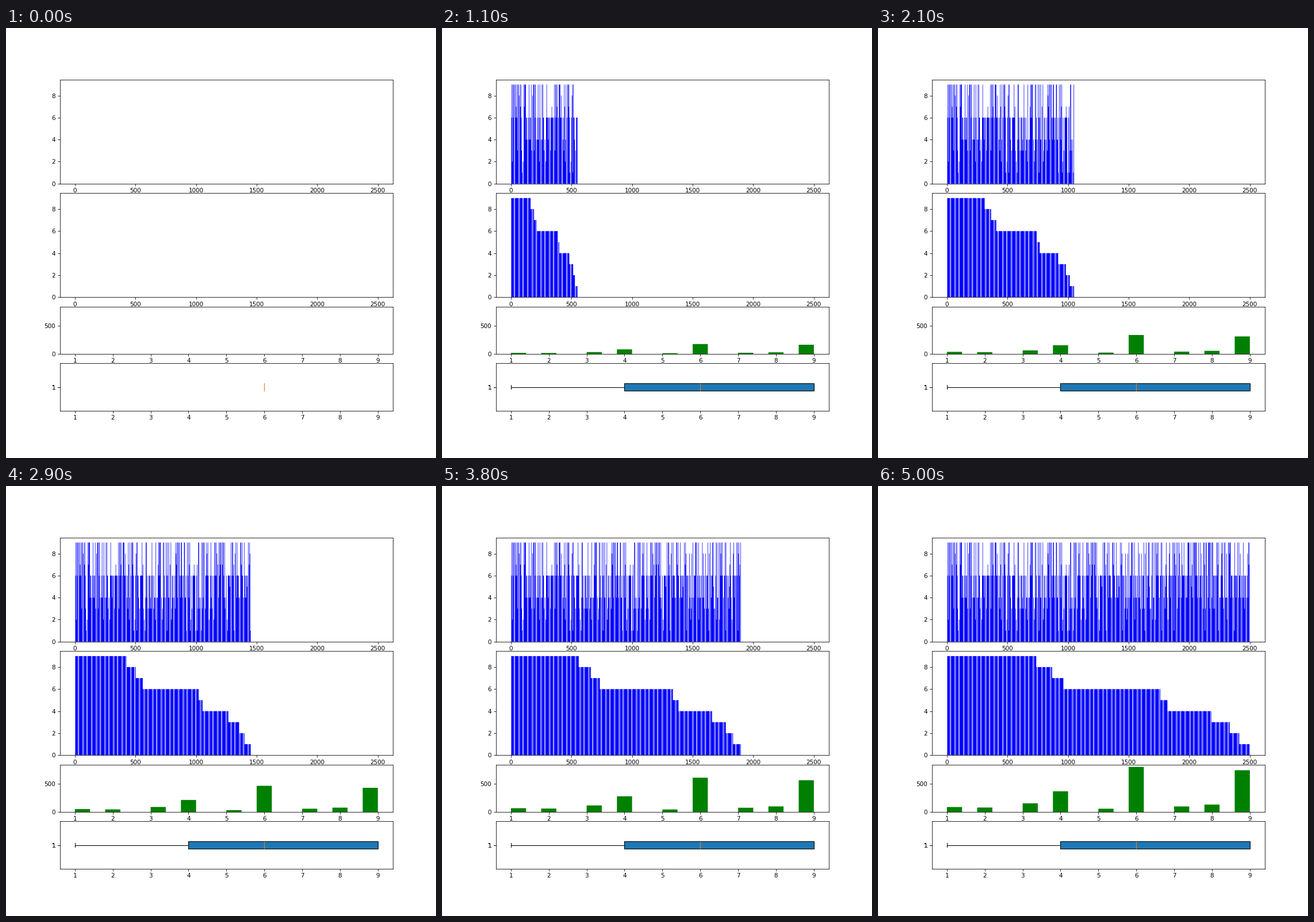
Write a matplotlib script that moves like this. It is 748x748 px and loops after 5.1 s.

```python
import numpy as np
import matplotlib.pyplot as plt
from matplotlib.animation import FuncAnimation

INCHES, DPI = 10, 74.8
FRAMES, STEP = 51, 50
# How often each value from 1 to 9 occurs.
COUNTS = [87, 78, 152, 365, 57, 797, 97, 130, 738]
TOTAL = sum(COUNTS)

BAR_HALF = 0.4
SPAN = (TOTAL - 1 + 2 * BAR_HALF) * 1.1
X_LEFT = (TOTAL - 1 - SPAN) / 2

# The bars are thinner than a screen column, so each column samples one bar or a gap.
COLUMNS = 775
col_edges = X_LEFT + np.arange(COLUMNS + 1) / COLUMNS * SPAN
col_mids = (col_edges[:-1] + col_edges[1:]) / 2
col_index = np.round(col_mids).astype(int)
on_bar = (np.abs(col_mids - col_index) < BAR_HALF) & (col_index >= 0)


def make_data():
    """Spread every value evenly with jitter, and begin with a six."""
    rng = np.random.default_rng(7)
    times = np.concatenate([(np.arange(c) + rng.random(c)) / c for c in COUNTS])
    data = np.repeat(np.arange(1, 10), COUNTS)[np.argsort(times)]
    return np.roll(data, -np.argmax(data == 6))


def sample(heights):
    """Height seen in each screen column."""
    seen = on_bar & (col_index < len(heights))
    return np.where(seen, heights[np.where(seen, col_index, 0)], 0)


def add_bars(ax):
    bars = ax.stairs(np.zeros(COLUMNS), col_edges, fill=True, color="b", snap=False)
    ax.set_xlim(X_LEFT, X_LEFT + SPAN)
    ax.set_ylim(0, 9.45)
    return bars


def add_box(ax, values):
    parts = ax.boxplot(values, vert=False, patch_artist=True, manage_ticks=False)
    return [artist for group in parts.values() for artist in group]


def show(artists, visible):
    for artist in artists:
        artist.set_visible(visible)


data = make_data()

fig = plt.figure(figsize=(INCHES, INCHES), dpi=DPI, facecolor="white")
grid = fig.add_gridspec(6, 1, left=0.125, right=0.9, bottom=0.11, top=0.88, hspace=0.2)
raw_ax = fig.add_subplot(grid[0:2])
sorted_ax = fig.add_subplot(grid[2:4])
hist_ax = fig.add_subplot(grid[4])
box_ax = fig.add_subplot(grid[5])

raw_bars = add_bars(raw_ax)
sorted_bars = add_bars(sorted_ax)

bins = np.linspace(1, 9, 21)
hist_bars = hist_ax.bar(bins[:-1], np.zeros(20), width=0.4, align="edge",
                        color="g", snap=False)
hist_ax.set_ylim(0, 1.05 * max(COUNTS))
hist_ax.set_yticks([0, 500])

first_box = add_box(box_ax, data[:1])
full_box = add_box(box_ax, data)
box_ax.set_ylim(0.5, 1.5)
# Stacked ticks give the heavy label.
box_ax.set_yticks([1] * FRAMES, ["1"] * FRAMES)

for ax in (hist_ax, box_ax):
    ax.set_xlim(0.6, 9.4)
    ax.set_xticks(range(1, 10))


def update(frame):
    part = data[:STEP * frame + 1]
    started = frame > 0
    raw_bars.set_data(values=sample(part))
    sorted_bars.set_data(values=sample(np.sort(part)[::-1]))
    show([raw_bars, sorted_bars, *hist_bars], started)
    for bar, count in zip(hist_bars, np.histogram(part, bins)[0]):
        bar.set_height(count)
    show(first_box, not started)
    show(full_box, started)
    return []


anim = FuncAnimation(fig, update, frames=FRAMES, interval=100,
                     init_func=lambda: update(0), repeat=True, repeat_delay=0)
plt.show()
```
